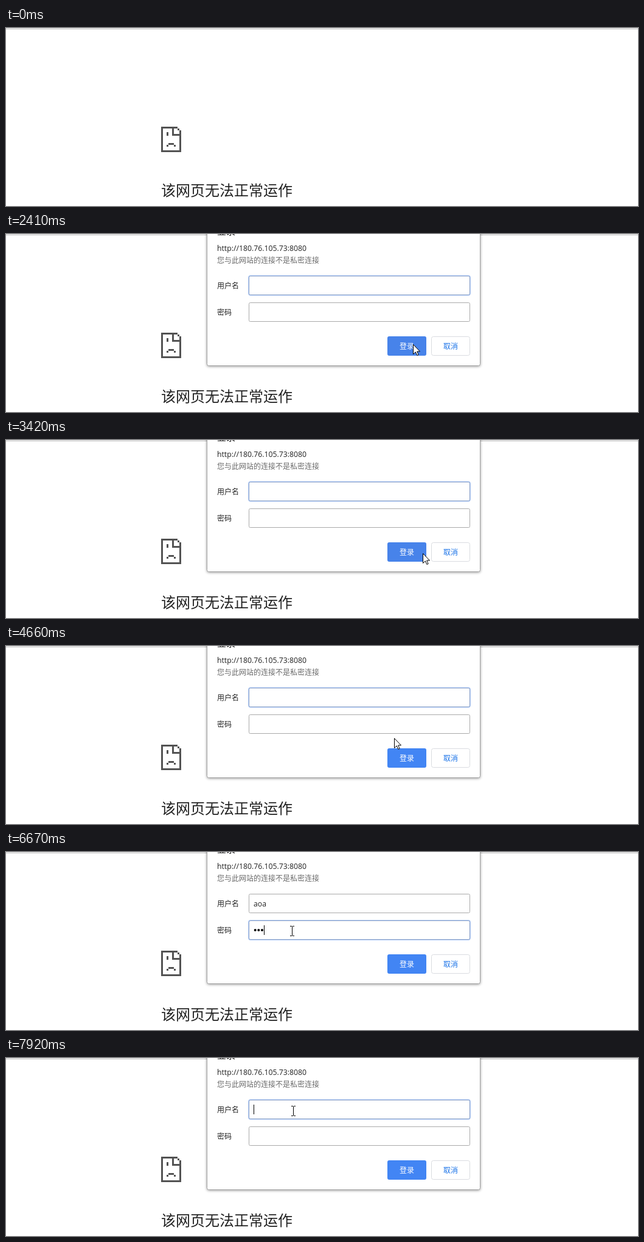
Write an HTML page that moves like this. It is 1039 px wide and 294 px high and loops after 8 s.

```html
<!DOCTYPE html>
<html lang="zh-CN">
<head>
<meta charset="utf-8">
<style>
html, body { margin: 0; width: 100%; height: 100%; overflow: hidden; background: #fff; }
svg { position: absolute; left: 0; top: 0; width: 1039px; height: 294px; overflow: visible; }
text { font: 12px "Noto Sans CJK SC", "Noto Sans CJK", sans-serif; fill: #222; white-space: pre; }
.latin { font: 12.25px "Open Sans", "Noto Sans", sans-serif; }
#dialog { transform-origin: 555px 23px; }
#frame { fill: #fff; stroke: #a2a2a2; filter: drop-shadow(0 1px 2px rgba(0,0,0,.4)); }
.field { fill: #fff; stroke: #aaa; }
.glow { fill: none; stroke: #4285f4; stroke-width: 2; stroke-opacity: .35; }
</style>
</head>
<body>
<svg>
  <path d="M0 1.5H1039" stroke="#b2b2b2"/>
  <path transform="translate(255 163) scale(3)" fill="#535353" shape-rendering="crispEdges"
    d="M0 0H9V1H10V2H11V14H0ZM1 1V13H10V5H6V1ZM7 1V4H10V2H9V1ZM3 3H4V5H3ZM4 9H7V10H4ZM3 10H4V11H3ZM7 10H8V11H7Z" fill-rule="evenodd"/>
  <text x="255" y="277" style="font-size:24px;font-weight:300">该网页无法正常运作</text>
</svg>
<svg id="dialog">
  <rect id="frame" x="330.5" y="-60.5" width="449" height="278" rx="3"/>
  <text x="347" y="1" style="font-size:15px">登录</text>
  <text x="347" y="28" class="latin">http://180.76.105.73:8080</text>
  <text x="347" y="48" style="fill:#6a6a6a">您与此网站的连接不是私密连接</text>
  <text x="347" y="90">用户名</text>
  <text x="347" y="134">密码</text>
  <rect class="field" x="399.5" y="69.5" width="363" height="31" rx="2"/>
  <rect class="field" x="399.5" y="113.5" width="363" height="31" rx="2"/>
  <rect class="glow" id="glow" x="399" y="69" width="364" height="32" rx="3"/>
  <text id="user" x="407" y="90" class="latin"></text>
  <g id="dots">
    <circle cx="409.7" cy="129" r="2"/><circle cx="415.3" cy="129" r="2"/><circle cx="421" cy="129" r="2"/>
  </g>
  <rect id="caret" width="1" height="16"/>
  <rect id="login" x="627" y="169" width="64" height="32" rx="3"/>
  <text x="647" y="190" style="fill:#fff">登录</text>
  <rect x="699.5" y="169.5" width="63" height="31" rx="3" fill="#fff" stroke="#dadce0"/>
  <text x="719" y="190" style="fill:#1a73e8">取消</text>
</svg>
<svg>
  <g id="cursor">
    <path id="arrow" fill="#fff" stroke="#000" d="M.5 .5V16.5L4.3 12.9 6.9 18.5 9.2 17.5 6.7 12H11.5Z"/>
    <path id="beam" fill="none" stroke="#000" d="M-3 -7.5H0M1 -7.5H4M.5 -7V8M-3 8.5H0M1 8.5H4"/>
  </g>
</svg>
<script>
const LOOP = 8000;
const el = id => document.getElementById(id);
const show = (id, on) => el(id).style.display = on ? '' : 'none';

// Tilt of the dialog over time: 0 is at rest, null is closed
const tilts = [[0, null], [770, .85], [850, 0],
  [2640, .13], [2710, 1], [2790, null], [2870, .75], [2950, .2], [3020, 0],
  [7460, .13], [7540, .85], [7610, null], [7770, .8], [7840, .2], [7920, 0]];
const blinks = [[0, 0], [850, 1], [1400, 0], [1860, 1], [2390, 0], [2640, 1], [3250, 0],
  [3800, 1], [4260, 0], [4740, 1], [6210, 0], [6290, 1], [7220, 0], [7920, 1]];
const userKeys = [5510, 5590, 5660], passKeys = [6440, 6620, 6670];

// Pointer moves: start, end, number of steps, x, y
const moves = [
  [1170, 1170, 1, 685, 246], [1250, 1400, 3, 663, 179], [1690, 1790, 2, 693, 174],
  [2010, 2560, 8, 661, 185], [3420, 3420, 1, 685, 187], [3500, 3570, 2, 730, 185],
  [3650, 3720, 2, 707, 187], [3950, 4030, 2, 717, 186], [4430, 5050, 9, 480, 83],
  [5820, 5910, 2, 482, 152], [5990, 6140, 3, 470, 130], [6900, 7300, 6, 642, 185],
  [7540, 7920, 6, 472, 87]];

const at = (list, t) => list.filter(k => k[0] <= t).pop()[1];
const typed = (keys, t) => t < 7610 ? keys.filter(k => k <= t).length : 0;

function pointer(t) {
  let x = 685, y = 246;
  for (const [start, end, n, tx, ty] of moves) {
    if (t < start) break;
    const done = end > start ? Math.floor((t - start) / (end - start) * (n - 1) + 1.001) : n;
    const f = Math.min(1, done / n);
    x += (tx - x) * f;
    y += (ty - y) * f;
  }
  return [Math.round(x), Math.round(y)];
}

function draw(t) {
  const p = at(tilts, t), open = p !== null;
  const inPass = t >= 6290 && t < 7610;
  const nUser = typed(userKeys, t), nPass = typed(passKeys, t);
  const [x, y] = pointer(t);
  const within = (l, top, r, b) => open && x >= l && x <= r && y >= top && y <= b;

  show('dialog', open);
  el('dialog').style.transform = p ?
    `translateY(${-13 * p}px) matrix3d(1,0,0,0, 0,1,0,${-.000123 * p}, 0,0,1,0, 0,0,0,1)` : 'none';
  el('dialog').style.opacity = 1 - .5 * p;

  el('glow').setAttribute('y', inPass ? 113 : 69);
  el('user').textContent = 'aoa'.slice(0, nUser);
  [...el('dots').children].forEach((dot, i) => dot.style.display = i < nPass ? '' : 'none');
  show('caret', at(blinks, t));
  el('caret').setAttribute('x', 407 + Math.round(inPass ? nPass * 5.6 : nUser * 7));
  el('caret').setAttribute('y', inPass ? 121 : 77);
  el('login').setAttribute('fill', !p && within(627, 169, 691, 201) ? '#4783ea' : '#4285f4');

  const beam = within(399, 69, 763, 101) || within(399, 113, 763, 145);
  show('cursor', t >= 1170);
  show('beam', beam);
  show('arrow', !beam);
  el('cursor').setAttribute('transform', `translate(${x} ${y})`);
}

const begin = performance.now();
function tick() {
  draw((performance.now() - begin) % LOOP);
  requestAnimationFrame(tick);
}
tick();
</script>
</body>
</html>
```
